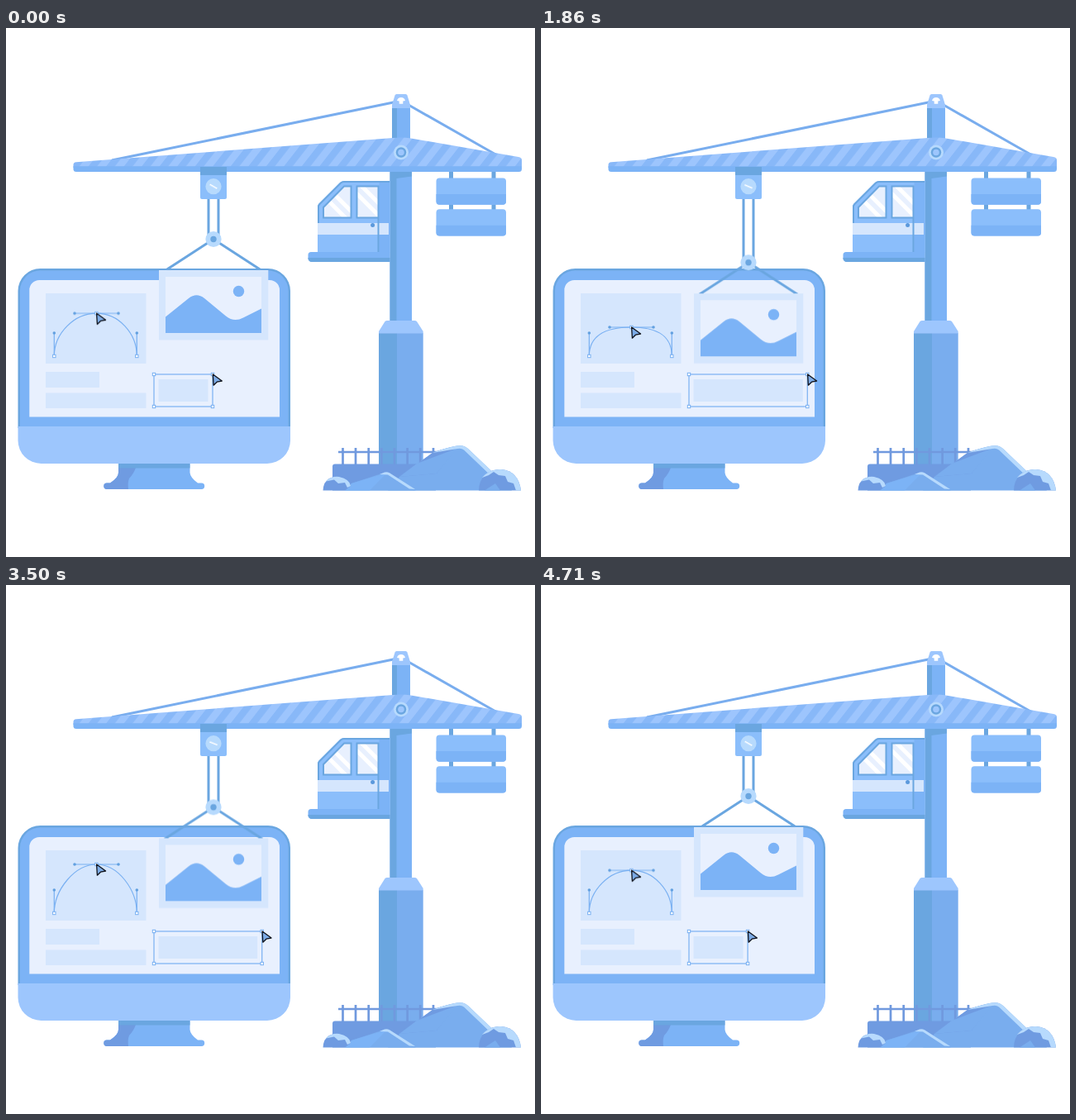
Animation, 640 px wide and 640 px high, one loop 5.07 s. Source, as an HTML page:

```html
<!DOCTYPE html>
<html lang="en">
<head>
<meta charset="utf-8">
<title>Crane building a page</title>
<style>
@property --r { syntax: "<number>"; inherits: true; initial-value: 0; }
html, body { margin: 0; width: 100%; height: 100%; overflow: hidden; background: #fff; }
svg { display: block; width: 100vw; height: 100vh; }

.sky { fill: #9dc6fd; }
.blue { fill: #7cb3f6; }
.soft { fill: #8bbefb; }
.deep { fill: #6aa6e0; }
.dusk { fill: #6f9be1; }
.shade { fill: #79adee; }
.pale { fill: #d5e6fd; }
.ice { fill: #e8f0fe; }
.glow { fill: #b7dafd; }
.rope { fill: none; stroke: #6aa6e0; stroke-width: 3; }
.wire { fill: none; stroke: #79adee; stroke-width: 3; }
.thin { fill: none; stroke: #79b0f2; stroke-width: 1.2; }
.knob { fill: #fff; stroke: #79b0f2; stroke-width: 1; }
.dot { fill: #62a0e0; }

.lift, .spin, .bend, .top, .sel {
  animation: 5070ms cubic-bezier(.3333, 0, .6667, 1) infinite;
}
.lift { animation-name: lift; }
.spin { animation-name: spin; transform-origin: 251px 191.7px; }
.bend { animation-name: bend; }
.top { animation-name: top; }
.sel { animation-name: grow; }
.box { width: calc(71px + var(--r) * 1px); }
.fill { width: calc(60px + var(--r) * 1px); }
.edge { transform: translateX(calc(var(--r) * 1px)); }

@keyframes lift {
  0%, 4.34%, 91.52%, 100% { transform: translateY(0); }
  29.19%, 44.97% { transform: translateY(28.2px); }
}
@keyframes spin {
  0%, 4.34%, 89.15%, 100% { transform: rotate(30deg); }
  29.19%, 48.13% { transform: rotate(383deg); }
}
@keyframes bend {
  0%, 80.87%, 100% { d: path("M58.3 397C58.3 369 83 345.2 109.4 345.2C136 345.2 158.3 369 158.3 397"); }
  11.44%, 42.21% { d: path("M58.3 397C58.3 369 83 362 109.4 362C136 362 158.3 369 158.3 397"); }
  56.41%, 69.03% { d: path("M58.3 397C58.3 369 83 338 109.4 338C136 338 158.3 369 158.3 397"); }
}
@keyframes top {
  0%, 80.87%, 100% { transform: translateY(345.2px); }
  11.44%, 42.21% { transform: translateY(362px); }
  56.41%, 69.03% { transform: translateY(338px); }
}
@keyframes grow {
  0%, 93.49%, 100% { --r: 0; }
  22.49%, 35.01% { --r: 74.5; }
  48.32% { --r: 25; }
  62.62%, 68.05% { --r: 60; }
}
</style>
</head>
<body>
<svg viewBox="0 0 640 640" xmlns="http://www.w3.org/2000/svg">
  <defs>
    <pattern id="stripes" width="21.5" height="40" patternUnits="userSpaceOnUse" patternTransform="translate(14 167) skewX(-38)">
      <rect width="21.5" height="40" fill="#9dc5fd"/>
      <rect width="10.5" height="40" fill="#88b8f8"/>
    </pattern>
    <path id="arrow" d="M0 0L.8 13.2L4.9 9.2L11 8Z" fill="#7cabe6" stroke="#10131c" stroke-width="1.3" stroke-linejoin="round"/>
    <rect id="knob" class="knob" x="-1.7" y="-1.7" width="3.4" height="3.4"/>
    <g id="weight">
      <rect class="soft" x="520.5" width="84.5" height="32.3" rx="4"/>
      <path class="blue" d="M520.5 19.5H605V28.3a4 4 0 0 1-4 4H524.5a4 4 0 0 1-4-4Z"/>
    </g>
    <clipPath id="panes"><path d="M384 229.5V217L409 191.5H417.5V229.5ZM424.5 191.5H450.5V229.5H424.5Z"/></clipPath>
  </defs>

  <!-- tower -->
  <g>
    <path class="wire" d="M128 160L471 89.5M486 92.5L595 154.5"/>
    <path class="blue" d="M467 96H489V136H467Z"/>
    <path class="deep" d="M467 96H473V136H467Z"/>
    <path class="sky" d="M472.5 80H483.5Q485 80 485.5 81.5L489 93V97H467V93L470.5 81.5Q471 80 472.5 80Z"/>
    <path fill="#fff" d="M473 88Q474 84 478 84Q482 84 483 88L480.3 88.4V91.7H475.7V88.4Z"/>
    <path class="blue" d="M464.5 173H491V356H464.5Z"/>
    <path class="deep" d="M464.5 173H491V179.5L472.5 182V356H464.5Z"/>
    <path class="shade" d="M451 369H504.7V528H451Z"/>
    <path class="deep" d="M451 369H473V528H451Z"/>
    <path class="sky" d="M461 354H494.5Q496 354 497 355L504.7 367V369.5H451V367L458.5 355Q459.5 354 461 354Z"/>
  </g>

  <!-- counterweights -->
  <path class="deep" d="M536 172H541V222H536ZM587.5 172H592.5V222H587.5Z"/>
  <use href="#weight" y="181.5"/>
  <use href="#weight" y="219.3"/>

  <!-- cabin -->
  <g>
    <path class="soft" d="M377 272V216Q377 214 378.5 212.5L404 187Q406 185 409 185H464.5V272Z"/>
    <path class="blue" d="M451.5 185H464.5V272H451.5Z"/>
    <path class="rope" stroke-width="2" style="stroke-width:2" d="M378 236V216Q378 214.5 379.5 213L405 187.5Q407 186 409 186H464"/>
    <path class="pale" d="M377 236H463V250H377Z"/>
    <g clip-path="url(#panes)">
      <path class="ice" d="M380 188H455V232H380Z"/>
      <path d="M382 201L415 234M394 198L426 230M423 199L455 231M426 187L458 219" fill="none" stroke="#fff" stroke-width="5"/>
    </g>
    <path class="rope" style="stroke-width:2" d="M384 229.5V217L409 191.5H417.5V229.5ZM424.5 191.5H450.5V229.5H424.5ZM450.5 229V271"/>
    <circle cx="443.6" cy="238.4" r="2.5" fill="#5b99dc"/>
    <path class="blue" d="M369 271H464.5V283H370a4.5 4.5 0 0 1-4.5-4.5V274.500a3.500 3.500 0 0 1 3.500-3.500Z"/>
    <path class="deep" d="M365.500 278H464.500V283H370a4.500 4.500 0 0 1-4.500-4.500Z"/>
  </g>

  <!-- jib -->
  <path d="M81.5 169V165.500Q81.500 162.500 85 162.200L468 133Q480 131.800 490 133.500L620 156Q624 156.700 624 160V169Z" fill="url(#stripes)"/>
  <path class="blue" d="M81.500 167.300H624V170.500a3.500 3.500 0 0 1-3.500 3.500H85a3.500 3.500 0 0 1-3.500-3.500Z"/>
  <circle class="glow" cx="478" cy="150.500" r="9"/>
  <circle class="deep" cx="478" cy="150.500" r="6.200"/>
  <circle class="sky" cx="478" cy="150.500" r="3.800"/>

  <!-- ground -->
  <g>
    <path d="M402 513H536M407.500 508V528M423 508V528M438.700 508V528M454.300 508V528M470 508V528M485.600 508V528M501.200 508V528M517 508V528" fill="none" stroke="#7099de" stroke-width="2.700"/>
    <path class="dusk" d="M398 527.500H520V559.500H395V530.500Q395 527.500 398 527.500Z"/>
    <path class="shade" d="M462 559.500L476 543L516 514Q540 505 550 505.200Q555 505.400 559 509L612 559.500Z"/>
    <path class="dusk" d="M476 543L516 514Q533 507.500 547 506L521 539Z"/>
    <path class="shade" d="M497 527L547 508L521 539L476 543Z"/>
    <path class="glow" d="M516 514Q540 505 550 505.200Q555 505.400 559 509L596 544L588 543L554 510.500Q551 508 546 509Z"/>
    <path class="dusk" d="M572 559.500Q572 548 580 540Q588 533.500 599 534Q620 536 623 559.500Z"/>
    <path class="glow" d="M576 544Q585 533 599 534Q620 536 623 559.500H617L614 551L607 549L604 542L596 541L590 537L584 541Z"/>
    <path class="shade" d="M598 559.500L592 551L579 559.500Z"/>
    <path class="shade" d="M410 559.500L418 551L456 538.500Q460 536.500 464 538.500L496 559.500Z"/>
    <path class="blue" d="M410 559.500L418 551L461 538L440 559.500Z"/>
    <path class="glow" d="M452 540L458 537.500Q461 536.500 464 538.300L495 558L488 557.500L462 540.500Z"/>
    <path class="dusk" d="M383.500 559.500Q384 549 391 545Q398 541.500 407 543.500Q416 547 417 554L410 559.500Z"/>
    <path class="glow" d="M387 548.500Q393 542 403 543Q416 546 417 554L413 556L410 550L402 551L397 546.500Z"/>
  </g>

  <!-- monitor -->
  <g>
    <path class="blue" d="M136 527H222.500V538Q223 544 232 550.500H236.500a3.700 3.700 0 0 1 0 7.400H122a3.700 3.700 0 0 1 0-7.400H126Q136 544 136 538Z"/>
    <path class="dusk" d="M136 532H157Q154 540 149 545Q147 550 148 557.900H122a3.700 3.700 0 0 1 0-7.400H126Q136 544 136 538Z"/>
    <path class="deep" d="M136 526H222.500V532.500H136Z"/>
    <path class="deep" d="M14.500 484V318a27 27 0 0 1 27-27H317a27 27 0 0 1 27 27V484Z"/>
    <path class="blue" d="M17 484V318a24.500 24.500 0 0 1 24.500-24.500H317a24.500 24.500 0 0 1 24.500 24.500V484Z"/>
    <path class="sky" d="M14.500 482H344V499a28 28 0 0 1-28 28H42.500a28 28 0 0 1-28-28Z"/>
    <path class="ice" d="M28.300 470.500V317a12 12 0 0 1 12-12H319a12 12 0 0 1 12 12V470.500Z"/>
    <path class="pale" d="M48 321H169.500V406H48ZM48 416H113V435H48ZM48 441.500H169.500V460H48Z"/>
  </g>

  <!-- curve -->
  <path class="thin" d="M58.300 369V397M158.300 369V397"/>
  <path class="thin bend" d="M58.300 397C58.300 369 83 345.200 109.400 345.200C136 345.200 158.300 369 158.300 397"/>
  <circle class="dot" cx="58.300" cy="369" r="1.800"/>
  <circle class="dot" cx="158.300" cy="369" r="1.800"/>
  <use href="#knob" x="58.300" y="397"/>
  <use href="#knob" x="158.300" y="397"/>
  <g class="top">
    <path class="thin" d="M83 0H136"/>
    <circle class="dot" cx="83" r="1.800"/>
    <circle class="dot" cx="136" r="1.800"/>
    <use href="#knob" x="109.400"/>
    <use href="#arrow" x="109.600"/>
  </g>

  <!-- selection -->
  <g class="sel">
    <rect class="pale fill" x="184.500" y="425" width="60" height="27"/>
    <rect class="thin box" x="179" y="419" width="71" height="39"/>
    <use href="#knob" x="179" y="419"/>
    <use href="#knob" x="179" y="458"/>
    <g class="edge">
      <use href="#knob" x="250" y="419"/>
      <use href="#knob" x="250" y="458"/>
      <use href="#arrow" x="250.300" y="419"/>
    </g>
  </g>

  <!-- load -->
  <g class="lift">
    <path class="rope" d="M245 178V255M257 178V255M251 255.500L191 294.500M251 255.500L311 294.500"/>
    <circle class="glow" cx="251" cy="255.500" r="9.600"/>
    <circle class="deep" cx="251" cy="255.500" r="3.700"/>
    <path class="pale" d="M185 293H317.300V377.500H185Z"/>
    <path class="ice" d="M193 301H309V369H193Z"/>
    <path class="blue" d="M193 369V349.500L221 327Q230.500 319.500 240 327L266 348.500Q276 356.500 287 350.500L309 339.500V369Z"/>
    <circle class="blue" cx="281.500" cy="318.500" r="6.700"/>
  </g>

  <!-- trolley -->
  <rect class="soft" x="235" y="168" width="32" height="39" rx="2"/>
  <path class="deep" d="M235 168H267V178H235Z"/>
  <circle class="glow" cx="251" cy="191.700" r="9.600"/>
  <path class="spin" d="M246 191.700H256" stroke="#fff" stroke-width="1.500"/>
</svg>
</body>
</html>
```
